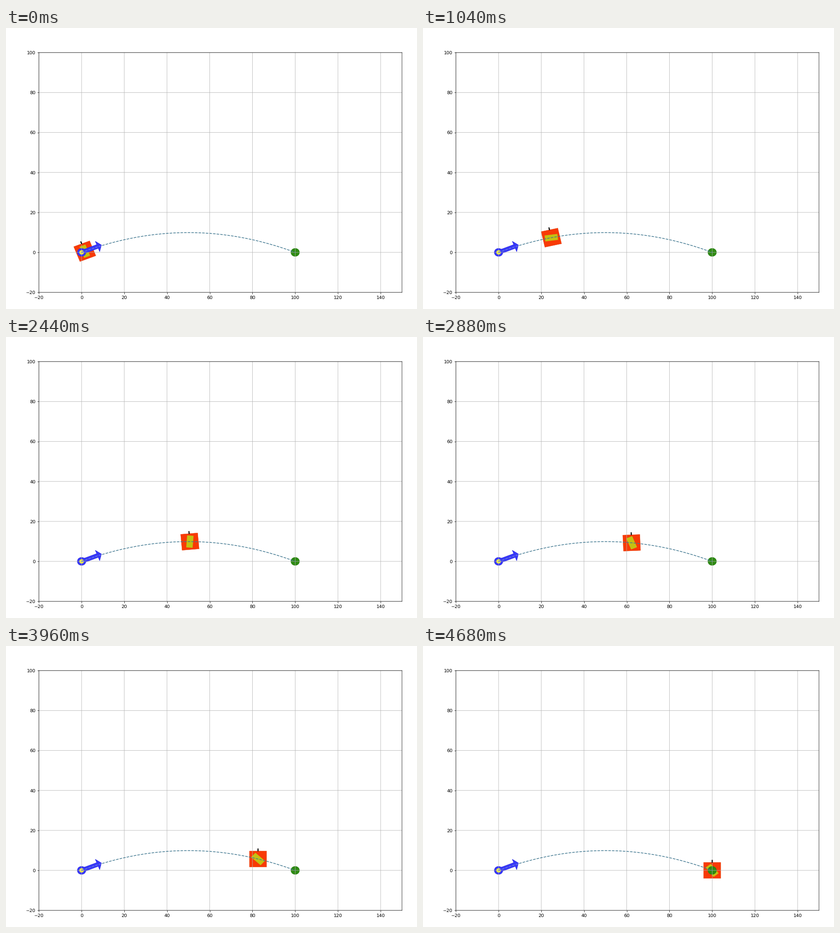
A matplotlib script that plays this animation: 903 px wide and 620 px high, repeating every 4720 ms.

```python
import numpy as np
import matplotlib.pyplot as plt
from matplotlib.animation import FuncAnimation
from matplotlib.patches import Circle, FancyArrow, Polygon

W, H, DPI = 903, 620, 72
FRAMES, INTERVAL = 118, 40
SLOPE, RANGE = 0.396, 100

# Distance covered at a few moments; playback speed is uneven.
KEY_FRAMES = [0, 26, 42, 61, 72, 84, 99, 117]
KEY_X = [1.5, 24.7, 36.2, 50.7, 62.3, 70.2, 82.6, 100]

# Wheel angle (degrees) as a smooth function of distance.
WHEEL = np.polyfit([1.5, 24.7, 36.2, 50.7, 62.3, 82.6, 100],
                   [111.4, 188.4, 222.4, 266, 293.3, 317.3, 308.1], 4)


def height(x):
    return SLOPE * x * (1 - x / RANGE)


def tilt(x):
    return 22 * max(0, 1 - x / 82) ** 1.55


def place(points, x, y, degrees):
    a = np.radians(degrees)
    c, s = np.cos(a), np.sin(a)
    return np.asarray(points) @ np.array([[c, s], [-s, c]]) + (x, y)


def box(w, h):
    return np.array([(-w, -h), (w, -h), (w, h), (-w, h)]) / 2


BODY, ROTOR = box(8, 8), box(6, 3)
ANTENNA = [(0, 4.1), (0, 5)]

plt.rcParams.update({"font.family": "DejaVu Sans", "font.size": 10.1,
                     "text.hinting": "none", "text.hinting_factor": 1})
fig = plt.figure(figsize=(W / DPI, H / DPI), dpi=DPI, facecolor="white")
ax = fig.add_axes([72.2 / W, 36.75 / H, 797.8 / W, 529.1 / H])
ax.set_xlim(-20, 150)
ax.set_ylim(-20, 100)
ax.grid(True)

body = ax.add_patch(Polygon(BODY, fc="#f83a06", ec="#e03c08", lw=0.5))
rotor = ax.add_patch(Polygon(ROTOR, fc="#c4c012", ec="none"))

angle = np.arctan(SLOPE)
arrow = ax.add_patch(FancyArrow(
    0, 0, 8 * np.cos(angle), 8 * np.sin(angle), width=2, head_width=5.6,
    head_length=2, fc="#3737f8", ec="#2a2ae6", lw=0.8))
ax.add_patch(Circle((0, 0), 2, fc="#3737f8", ec="#2a2ae6", lw=0.8))
ax.add_patch(Circle((0, 0), 1, fc="#f0f04a", ec="#e2e23c", lw=0.8))
ax.add_patch(Circle((RANGE, 0), 2, fc="#2d8a12", ec="#26800e", lw=0.8))

xs = np.linspace(0, RANGE, 200)
ax.plot(xs, height(xs), "--", color="#447a92", lw=1.5)
# The path shows only faintly where it crosses the arrow.
faint, = ax.plot(xs, height(xs), "--", color="#6470ee", lw=1.7,
                 dashes=(3.7 * 1.5 / 1.7, 1.6 * 1.5 / 1.7), zorder=2.1)
faint.set_clip_path(arrow)

antenna, = ax.plot([], [], color="black", lw=2.3,
                   solid_capstyle="projecting", zorder=2.2)

# Keep straight edges at sub-pixel positions.
for part in [body, rotor, antenna, *ax.spines.values(),
             *ax.get_xgridlines(), *ax.get_ygridlines()]:
    part.set_snap(False)


def update(i):
    x = np.interp(i, KEY_FRAMES, KEY_X)
    y = height(x)
    body.set_xy(place(BODY, x, y, tilt(x)))
    rotor.set_xy(place(ROTOR, x, y, np.polyval(WHEEL, x)))
    antenna.set_data(*place(ANTENNA, x, y, tilt(x)).T)
    return body, rotor, antenna


anim = FuncAnimation(fig, update, frames=FRAMES, interval=INTERVAL,
                     init_func=lambda: update(0), repeat=True,
                     repeat_delay=0, blit=False)
plt.show()
```
